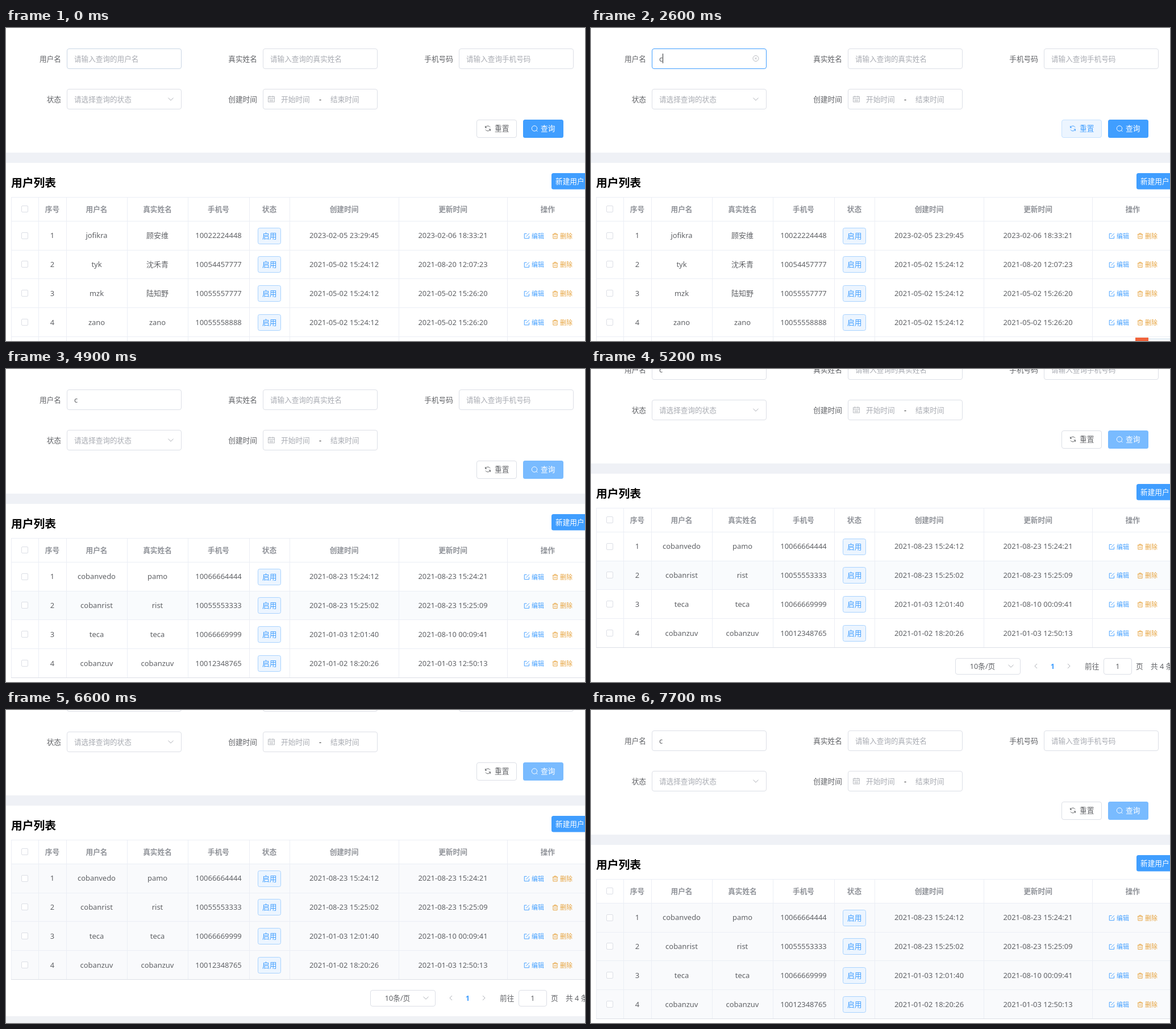
These frames come from a looping animation (1019 px wide and 550 px high, 8 s). An HTML page:

```html
<!DOCTYPE html>
<html lang="zh-CN">
<head>
<meta charset="utf-8">
<style>
  html, body { margin: 0; width: 100%; height: 100%; overflow: hidden; background: #fff }
  svg { display: block; font-family: "Noto Sans", "Noto Sans CJK SC", "Noto Sans CJK", sans-serif; white-space: pre }
</style>
</head>
<body>
<svg id="stage" width="1019" height="550" viewBox="0 0 1019 550"></svg>
<script>
const BLUE = '#409eff', GREY = '#606266', HINT = '#a8abb2', EDGE = '#dcdfe6', LINE = '#ebeef5', ORANGE = '#e6a23c';
const COLS = [9, 57, 106, 213, 320, 428, 499, 691, 882, 1025];
const HEADS = ['', '序号', '用户名', '真实姓名', '手机号', '状态', '创建时间', '更新时间', '操作'];
const ALL = [
  ['jofikra', '顾安维', '10022224448', '2023-02-05 23:29:45', '2023-02-06 18:33:21'],
  ['tyk', '沈禾青', '10054457777', '2021-05-02 15:24:12', '2021-08-20 12:07:23'],
  ['mzk', '陆知野', '10055557777', '2021-05-02 15:24:12', '2021-05-02 15:26:20'],
  ['zano', 'zano', '10055558888', '2021-05-02 15:24:12', '2021-05-02 15:26:20']
];
const FOUND = [
  ['cobanvedo', 'pamo', '10066664444', '2021-08-23 15:24:12', '2021-08-23 15:24:21'],
  ['cobanrist', 'rist', '10055553333', '2021-08-23 15:25:02', '2021-08-23 15:25:09'],
  ['teca', 'teca', '10066669999', '2021-01-03 12:01:40', '2021-08-10 00:09:41'],
  ['cobanzuv', 'cobanzuv', '10012348765', '2021-01-02 18:20:26', '2021-01-03 12:50:13']
];
const ROW = 50.7, TOP = 339;

const ramp = (t, a, b) => Math.min(1, Math.max(0, (t - a) / (b - a)));
const rgb = c => [1, 3, 5].map(i => parseInt(c.slice(i, i + 2), 16));
const mix = (a, b, k) => `rgb(${rgb(a).map((v, i) => Math.round(v + (rgb(b)[i] - v) * k))})`;

// y is the vertical middle of the text
const text = (x, y, s, fill = GREY, size = 12.7, anchor = 'start', weight = 400) =>
  `<text x="${x}" y="${y + size * .37}" fill="${fill}" font-size="${size}" text-anchor="${anchor}" font-weight="${weight}">${s}</text>`;
const fillBox = (x, y, w, h, fill, r = 0) => `<rect x="${x}" y="${y}" width="${w}" height="${h}" rx="${r}" fill="${fill}"/>`;
const frame = (x, y, w, h, stroke = EDGE, fill = '#fff', r = 3.5) =>
  `<rect x="${x + .5}" y="${y + .5}" width="${w - 1}" height="${h - 1}" rx="${r}" stroke="${stroke}" fill="${fill}"/>`;
const path = (x, y, d, stroke, width = .95) =>
  `<path transform="translate(${x} ${y})" d="${d}" fill="none" stroke="${stroke}" stroke-width="${width}"/>`;
const circle = r => `M${-r} 0A${r} ${r} 0 1 1 ${r} 0A${r} ${r} 0 1 1 ${-r} 0`;

const ICON = {
  down: 'M-4.5 -2.2L0 2.2L4.5 -2.2',
  left: 'M2 -4L-2 0L2 4',
  right: 'M-2 -4L2 0L-2 4',
  clear: circle(5) + 'M-1.8 -1.8L1.8 1.8M1.8 -1.8L-1.8 1.8',
  search: circle(4.7) + 'M3.3 3.3L5.5 5.5',
  reset: 'M-4.4 -1A4.5 4.5 0 0 1 4 -2M4.4 1A4.5 4.5 0 0 1 -4 2M-4.4 -4.5V-1.4H-1.6M4.4 4.5V1.4H1.6',
  date: 'M-5.5 -4.5H5.5V5H-5.5ZM-5.5 -1.5H5.5M-2.7 -6V-3.2M2.7 -6V-3.2M-3.5 1H3.5M-3.5 3H3.5',
  edit: 'M0 -4H-4.2V4.3H4V0M-1.2 1.2L4.4 -4.4',
  trash: 'M-4.6 -2.8H4.6M-1.7 -2.8V-4.5H1.7V-2.8M-3.6 -2.8V4.5H3.6V-2.8M-1.2 -.6V2.4M1.2 -.6V2.4'
};

function scrollAt(t) {
  if (t < 5100 || t >= 7300) return 0;
  if (t < 5400) return [2, 53, 66][(t - 5100) / 100];
  return t < 7100 ? 69 : t < 7200 ? 53 : 24;
}

function field(x, y, label, hint, edge) {
  return text(x - 10, y + 18, label, GREY, 12.7, 'end') + frame(x, y, 202, 36, edge) +
    text(x + 13, y + 18, hint, HINT, 12.6);
}

function form(t) {
  const typed = t >= 1500, focused = t >= 600 && t < 3000;
  const edge = t < 600 ? (t < 300 ? '#c9d6e4' : '#c0c4cc')
    : t < 3000 ? mix('#c0c4cc', BLUE, ramp(t, 500, 700)) : mix(BLUE, EDGE, ramp(t, 2900, 3200));
  let s = field(107, 36, '用户名', typed ? '' : '请输入查询的用户名', edge) +
    field(452, 36, '真实姓名', '请输入查询的真实姓名') +
    field(797, 36, '手机号码', '请输入查询手机号码') +
    field(107, 107, '状态', '请选择查询的状态') +
    field(452, 107, '创建时间', '');
  if (typed) s += text(120, 54, 'c', GREY, 12.9);
  if (typed && focused) s += path(290, 53.5, ICON.clear, HINT, .8);
  const blink = (t - (typed ? 1500 : 600)) % 1000 < 500;
  if (focused && blink) s += fillBox(typed ? 126 : 121, 45, 1, 17, '#303133');
  s += path(290, 125, ICON.down, HINT) + path(467, 125, ICON.date, HINT, .8) +
    text(484, 125, '开始时间', HINT) + text(553, 125, '-', '#303133', 12.7, 'middle') + text(571, 125, '结束时间', HINT);

  const hot = ramp(t, 2400, 2600) * (1 - ramp(t, 2600, 2800));
  const ink = mix(GREY, BLUE, hot);
  s += frame(828, 161, 71, 32, mix(EDGE, '#c6e2ff', hot), mix('#ffffff', '#ecf5ff', hot)) +
    path(848, 176.5, ICON.reset, ink) + text(860, 176.5, '重置', ink) +
    fillBox(910, 161, 71, 32, mix(BLUE, '#79bbff', ramp(t, 2600, 2800)), 3.5) +
    path(930, 176.5, ICON.search, '#fff') + text(941, 176.5, '查询', '#fff');
  return s;
}

function tint(t, i) {
  if (t >= 5400) return '#f9fafc';
  return t >= 3300 && i === 1 ? '#f9fbfd' : '#fff';
}

function table(t) {
  const found = t >= 3200, rows = found ? FOUND : ALL;
  const mid = i => (COLS[i] + COLS[i + 1]) / 2;
  const bottom = found ? 542 : 640;
  let s = '';
  rows.forEach((row, i) => {
    const y = TOP + ROW * i, c = y + 25.7;
    s += fillBox(10, y, 1009, ROW, tint(t, i)) + frame(27, Math.round(c) - 6, 12, 12, EDGE, '#fff', 1.5) +
      text(mid(1), c, i + 1, GREY, 12.9, 'middle');
    [2, 3, 4, 6, 7].forEach((col, k) => s += text(mid(col), c, row[k], GREY, 12.95, 'middle'));
    s += frame(443, Math.round(c) - 14, 41, 29, '#a9d3ff', '#ecf5ff', 3) + text(463.7, c + .3, '启用', BLUE, 12.8, 'middle') +
      path(916.5, c + .7, ICON.edit, BLUE) + text(925, c + .8, '编辑', BLUE, 10.9) +
      path(966.5, c + .7, ICON.trash, ORANGE) + text(975, c + .8, '删除', ORANGE, 10.9);
  });
  HEADS.forEach((h, i) => s += text(mid(i), 318.5, h, '#909399', 12.7, 'middle', 700));
  s += frame(27, 312, 12, 12, EDGE, '#fff', 1.5);
  COLS.forEach(x => s += fillBox(x, 297, 1, bottom - 297, LINE));
  s += fillBox(9, 297, 1010, 1, LINE);
  for (let i = 0; i < 5; i++) s += fillBox(9, Math.round(TOP + ROW * i), 1010, 1, found && i === 4 ? EDGE : LINE);
  return s;
}

function pager() {
  return frame(641, 561, 115, 29) + text(689, 575.5, '10条/页', GREY, 12.7, 'middle') + path(739, 575, ICON.down, HINT) +
    path(783, 575, ICON.left, HINT) + text(812.5, 575.5, '1', BLUE, 12.7, 'middle', 700) + path(841, 575, ICON.right, HINT) +
    text(869, 575.5, '前往') + frame(902, 561, 50, 29) + text(927, 575.5, '1', GREY, 12.7, 'middle') +
    text(959, 575.5, '页') + text(985, 575.5, '共 4 条') + fillBox(0, 607, 1019, 60, '#f0f2f5');
}

function draw(t) {
  let s = `<g transform="translate(0 ${-scrollAt(t)})">` + form(t) + fillBox(0, 219, 1019, 18, '#eff1f6') +
    text(9, 272, '用户列表', '#000', 19.8, 'start', 700) +
    fillBox(960, 255, 72, 28.5, BLUE, 3.5) + text(967, 269, '新建用户', '#fff') +
    table(t) + (t >= 3200 ? pager() : '') + '</g>';
  // input method bar peeking in at the bottom
  if (t >= 700 && t < 3300) s += fillBox(981, 546, 38, 4, '#fff') + fillBox(981, 546, 38, 1, '#c3d6e6') + fillBox(958, 544, 23, 23, '#f0643c');
  return s;
}

const stage = document.getElementById('stage');
let shown = -1;
function tick() {
  const t = Math.floor(performance.now() % 8000 / 100) * 100;
  if (t !== shown) stage.innerHTML = draw(shown = t);
  requestAnimationFrame(tick);
}
tick();
</script>
</body>
</html>
```
